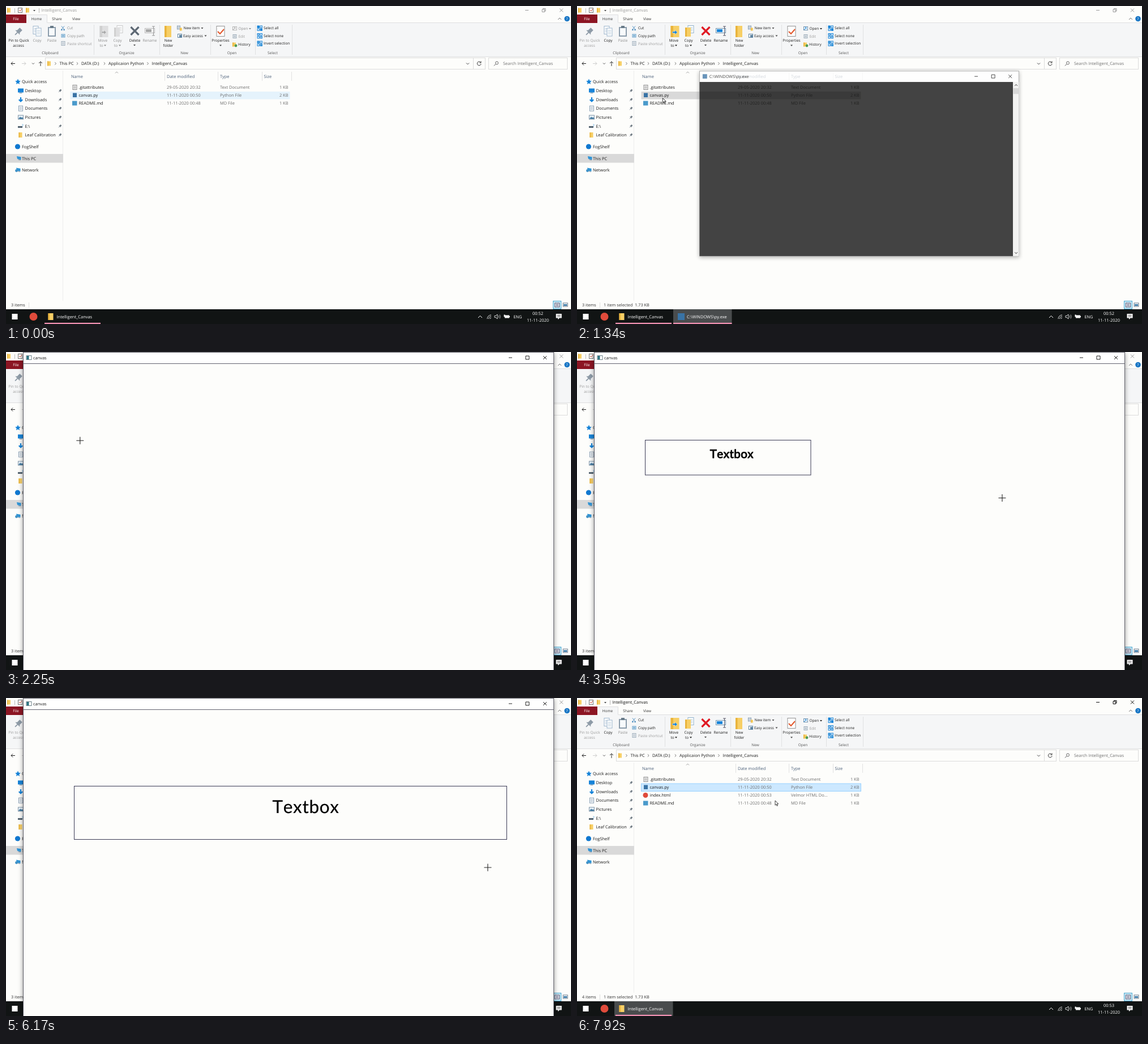
Write an HTML page that moves like this. It is 998x561 px and loops after 8 s.

```html
<!DOCTYPE html>
<html lang="en">
<head>
<meta charset="utf-8">
<title>Canvas demo</title>
<style>
html, body { margin: 0; width: 100%; height: 100%; overflow: hidden; background: #fdfdfb; }
svg { display: block; width: 100%; height: 100%; }
text { font-family: "Open Sans", "Noto Sans", sans-serif; text-rendering: geometricPrecision; white-space: pre; }
#label { font-family: Lato, sans-serif; font-kerning: none; letter-spacing: .022em; }
</style>
</head>
<body>
<svg id="stage" viewBox="0 0 998 561"></svg>
<script>
const INK = '#1c1c1c', GREY = '#9b9b9b', BLUE = '#1683d8', GOLD = '#f7cf66', PINK = '#ee8fb0', PAPER = '#fdfdfb';

// Drawing helpers; text y is the vertical middle of the line
const rect = (x, y, w, h, fill, more = '') =>
  `<rect x="${x}" y="${y}" width="${w}" height="${h}" style="fill:${fill}" ${more}/>`;
const path = (d, stroke, w = 1, fill = 'none') =>
  `<path d="${d}" style="stroke:${stroke};fill:${fill}" stroke-width="${w}"/>`;
const dot = (x, y, r, fill) => `<circle cx="${x}" cy="${y}" r="${r}" fill="${fill}"/>`;
const text = (x, y, s, fill = INK, size = 7.45, anchor = 'start', id = '') =>
  `<text x="${x}" y="${y + size * 0.36}" font-size="${size}" text-anchor="${anchor}" style="fill:${fill}" ${id && `id="${id}"`}>${s}</text>`;
const small = (x, y, s, fill = INK) => text(x, y, s, fill, 6.5);
const mid = (x, y, s, fill = INK, size = 6.5) => text(x, y, s, fill, size, 'middle');
const group = (id, body, more = '') => `<g id="${id}" ${more}>${body}</g>`;
const frame = (x, y, w, h, stroke, fill = 'none') =>
  rect(x + .5, y + .5, w - 1, h - 1, fill, `stroke="${stroke}" stroke-width="1"`);
const caret = (x, y, c = '#444') => path(`M${x - 2} ${y - 1}h4l-2 2.4z`, 'none', 0, c);
const chevron = (x, y) => path(`M${x - 1.2} ${y - 2.2}l2.3 2.2l-2.3 2.2`, '#666', .9);

const folder = (x, y, w = 7, h = 9) =>
  rect(x - w / 2, y - h / 2, w, h, GOLD) + rect(x - w / 2, y - h / 2, w * .3, h, '#e9b43c');
const page = (x, y, w = 8, h = 10, c = '#8aa0b4') =>
  frame(x - w / 2, y - h / 2, w, h, c, '#fff') +
  [-.2, 0, .2].map(k => path(`M${x - w * .28} ${y + h * k}h${w * .56}`, c, .8)).join('');
const screen = (x, y) => rect(x - 5, y - 4, 10, 7, BLUE) + rect(x - 2.5, y + 3.4, 5, 1, '#5c7f9c');
const tilted = (x, y) => path(`M${x - 3.5} ${y - 3}l7.5 1.2v5l-6.5 -1.4z`, 'none', 0, '#2f94d6') +
  path(`M${x - 1} ${y + 3}l4.5 .8`, '#5c7f9c', .9);
const pin = (x, y, k = 1, c = '#707b84') =>
  `<g transform="translate(${x} ${y}) rotate(45) scale(${k})">` +
  path('M-1.6 -3.2h3.2v3.2l1.2 1.2h-5.6l1.2 -1.2z', 'none', 0, c) + path('M0 1v3.2', c, .9) + '</g>';
const winIcon = (x, y) =>
  frame(x - 5, y - 4, 10, 8, '#6c8088', '#fff') + rect(x - 4, y - 3, 4, 6, '#2a7480');

// Minimise, maximise or restore, close
function controls(a, b, c, y, col, restore) {
  const box = restore
    ? `M${b - 3} ${y - 1.5}h4.5v4.5h-4.5zM${b - 1.5} ${y - 1.5}v-1.5h4.5v4.5h-1.5`
    : `M${b - 3} ${y - 3}h6v6h-6z`;
  return path(`M${a - 3} ${y}h6`, col) + path(box, col) +
    path(`M${c - 3} ${y - 3}l6 6m0 -6l-6 6`, col);
}

function ribbon() {
  const on = 'var(--on)', off = 'var(--off)';
  let s = rect(0, 30, 998, 59, '#f5f6f7') + path('M0 29.5h36m37 0h925M0 89.5h998', '#dedfe0') +
    rect(0, 15, 36, 15, '#8c1523') + mid(17.5, 22.5, 'File', '#fff') +
    rect(36, 15, 37, 15, '#f5f6f7') + path('M36.5 15.5h36v14', '#dedfe0') +
    mid(54, 22.5, 'Home', '#333') + mid(90, 22.5, 'Share', '#333') + mid(124, 22.5, 'View', '#333') +
    path('M975 24l3 -3l3 3', '#777') + dot(991, 22.5, 4.8, '#1976c5') + mid(991, 22.5, '?', '#fff') +
    path('M155.5 33v53M271.5 33v53M361.5 33v53M440.5 33v53M505.5 33v53', '#e0e1e2');
  s += pin(22, 45, 2, '#8e9ba7') + mid(22.5, 61, 'Pin to Quick', off) + mid(22, 70, 'access', off) +
    page(52.5, 42.5, 10, 15, '#9db6cd') + page(57.5, 46, 10, 15, '#9db6cd') + mid(55, 61, 'Copy', on) +
    rect(74, 37, 14, 17, '#8b9cab') + rect(76, 39, 10, 13, '#f7fafc') + rect(78, 35, 6, 4, '#687a88') +
    mid(81, 61, 'Paste', '#8d8d8d') +
    path('M98 35.5l5 6m0 -6l-5 6', '#3d83b8', .9) + dot(98.4, 42, 1.2, '#3d83b8') + dot(102.6, 42, 1.2, '#3d83b8') +
    page(101, 52.5, 7, 6, '#5f9cc8') + page(101, 66, 7, 8, '#9aaab8') +
    small(108, 39, 'Cut', on) + small(108, 52.5, 'Copy path', on) + small(108, 66.5, 'Paste shortcut', GREY);
  const arrow = 'M-6 0h6v-3.5l6 5.5l-6 5.5v-3.5h-6z';
  s += group('tools', folder(173, 45, 15, 20) +
    `<g transform="translate(173 45) scale(.7)">${path(arrow, '#fff', .6, BLUE)}</g>` +
    page(201, 41, 11, 14, '#8fb1cc') + folder(196, 46, 10, 16) +
    frame(245, 39, 18, 9, '#6d91ad', '#fff') + rect(247, 41, 10, 5, BLUE) +
    path('M258 36h5m-2.5 0v16m-2.5 0h5', '#445', .9) +
    frame(400, 36, 8, 7, '#6d91ad', '#fff') + path('M401 42l4 -4m-2.5 0h2.5v2.5', BLUE)) +
    path('M220.5 37l14 14m0 -14l-14 14', 'var(--del)', 3.2) +
    mid(171, 61, 'Move', on) + mid(197, 61, 'Copy', on) + mid(227.5, 61, 'Delete') + mid(254, 61, 'Rename', on) +
    mid(168.5, 70, 'to', on) + mid(194, 70, 'to', on) + caret(175, 69.5, on) + caret(201, 69.5, on) + caret(227, 69);
  s += folder(286, 45, 12, 20) + mid(286.5, 61, 'New') + mid(286.5, 70, 'folder') +
    page(305, 38, 6, 7) + folder(309, 41, 4, 5) + frame(303, 49, 8, 7, '#5f84a0', '#fff') + rect(306, 51, 5, 5, '#5f84a0') +
    small(313.5, 39, 'New item') + caret(346.5, 39) + small(313, 52.5, 'Easy access') + caret(352.5, 52.5) +
    frame(371.5, 35, 15, 19, '#929292', '#fff') + path('M374 45l4 4l7 -8', '#e2572c', 2) +
    mid(379, 61, 'Properties') + caret(379, 69.5) +
    page(404, 53.5, 7, 7, '#9aaab8') + folder(403, 68, 6, 7) + dot(406, 70, 2.4, '#4d9c58') +
    small(410.5, 40, 'Open', on) + caret(431, 40, on) + small(410.5, 53.5, 'Edit', GREY) + small(410, 68, 'History');
  [['Select all', 39, BLUE], ['Select none', 52.5, '#a9cbe4'], ['Invert selection', 66, '#5ba7dc']].forEach(([n, y, c]) => {
    for (let i = 0; i < 4; i++) s += frame(443.5 + (i % 2) * 5, y - 4.5 + (i >> 1) * 5, 4.4, 4.4, BLUE, i % 3 ? '#e8f2fa' : c);
    s += small(455, y, n);
  });
  [['Clipboard', 78], ['Organize', 213], ['New', 315], ['Open', 399], ['Select', 471]]
    .forEach(([n, x]) => s += mid(x, 83, n, '#555'));
  return s;
}

function addressBar() {
  let s = path('M16 101.5h-7m3 -3l-3 3l3 3', '#222') + path('M28 101.5h7m-3 -3l3 3l-3 3', '#ccc') +
    path('M46 100.5l2 2l2 -2', '#555') + path('M61 106v-8m-3 3l3 -3l3 3', '#333') +
    frame(69, 91, 757, 21, '#dcdcdc') + frame(825, 91, 22, 21, '#dcdcdc') + frame(852, 91, 140, 21, '#dcdcdc') +
    folder(76, 101.5, 6, 8) + path('M813 100.5l2.5 2.5l2.5 -2.5', '#444') +
    path('M838.5 99.5a3.4 3.4 0 1 0 .6 2.5M839 97.5v2.6h-2.6', '#333') +
    `<circle cx="867" cy="100.5" r="2.5" fill="none" stroke="#555" stroke-width=".9"/>` + path('M865 102.5l-3 3', '#555') +
    text(878, 101.5, 'Search Intelligent_Canvas', '#707070');
  [['This PC', 94.5], ['DATA (D:)', 133], ['Applicaion Python', 181], ['Intelligent_Canvas', 257.5]]
    .forEach(([n, x]) => s += chevron(x - 7, 101.5) + text(x, 101.5, n));
  return s;
}

function navPane() {
  const y = i => 149.5 + i * 15.6;
  let s = path('M100.5 114v406', '#ededed') + rect(0, 261, 101, 15.5, '#d9d9d9') +
    path('M21 128.6l1.4 3.2l3.4 .4l-2.5 2.3l.7 3.4l-3 -1.7l-3 1.7l.7 -3.4l-2.5 -2.3l3.4 -.4z', 'none', 0, BLUE) +
    text(28, 133.5, 'Quick access') +
    screen(26, y(0)) + path(`M26 ${y(1) - 4}v7m-3.2 -3l3.2 3.2l3.2 -3.2`, BLUE, 2.2) + page(26, y(2)) +
    frame(21, y(3) - 4, 10, 8, '#8195a6', '#e9f3fa') + path(`M22 ${y(3) + 3}l3 -4l2 2l1.5 -1.5l2 3.5z`, 'none', 0, '#3f779f') +
    rect(21, y(4), 8, 3, '#50606c') + text(28, y(4) - 1, '?', BLUE, 6) + folder(25.5, y(5), 6, 9);
  ['Desktop', 'Downloads', 'Documents', 'Pictures', 'E:\\'].forEach((n, i) => s += text(33.5, y(i), n));
  for (let i = 0; i < 6; i++) s += pin(95.5, y(i), .85);
  s += `<g clip-path="url(#navClip)">${text(33.5, y(5), 'Leaf Calibration')}</g>` +
    dot(20.5, 248, 4.6, '#0f78d0') + text(28, 248, 'FogShelf') +
    tilted(22.5, 268) + text(28, 269, 'This PC') +
    tilted(21.5, 288.5) + dot(18.5, 290.5, 2.4, '#3f91c6') + text(28, 289.5, 'Network');
  return s;
}

function fileList() {
  const row = (y, name, date, type, size) => text(128.5, y, name) + text(284, y, date, '#6d6d6d') +
    text(378, y, type, '#6d6d6d') + text(498.5, y, size, '#6d6d6d', 7.45, 'end');
  return path('M280.5 116v16M374.5 116v16M452.5 116v16M504.5 116v16', '#e2e2e2') +
    path('M193 118.5l2.5 -2.5l2.5 2.5', '#888', .8) +
    [['Name', 115], ['Date modified', 284], ['Type', 378], ['Size', 455.5]].map(([n, x]) => text(x, 124, n, '#4c607a')).join('') +
    rect(113.5, 151, 388, 13.5, 'var(--row)', 'id="row"') +
    page(121.5, 143.5, 8, 9, '#8b8b8b') + rect(118, 153.5, 7, 7.5, '#3973a5') +
    row(143.5, '.gitattributes', '29-05-2020 20:32', 'Text Document', '1 KB') +
    row(157.5, 'canvas.py', '11-11-2020 00:50', 'Python File', '2 KB') +
    group('page', dot(121, 171.5, 4.5, '#df4b3b') + row(171.5, 'index.html', '11-11-2020 00:53', 'Velmor HTML Do...', '1 KB')) +
    group('readme', rect(117, 167.5, 8.5, 8, '#4a9acb') + row(171.5, 'README.md', '11-11-2020 00:48', 'MD File', '1 KB'));
}

function explorer() {
  return rect(0, 0, 998, 561, PAPER) + folder(5, 7.5, 6, 8) + path('M15.5 4v8M58.5 4v8', '#aaa', .8) +
    frame(21, 3, 8, 9, '#777', '#fff') + path('M23 7l2 2l3 -4', '#cc4b35') + folder(38, 7.5, 6, 8) + caret(50, 8) +
    text(62.5, 7.5, 'Intelligent_Canvas', 'var(--title)') + controls(920, 950, 981, 7.5, 'var(--title)', true) +
    ribbon() + addressBar() + navPane() + fileList() +
    text(9, 527.5, '3 items', '#333', 7.3, 'start', 'count') + path('M40.5 523v9', '#ddd') +
    text(47, 527.5, '1 item selected  1.73 KB', '#333', 7.3, 'start', 'status') +
    frame(966, 520, 15, 15, '#4fa6cf', '#c5e8f5') + page(973.5, 527.5, 9, 8, '#557') +
    frame(983.5, 523.5, 9, 7, '#678', '#fff') + rect(985, 526, 6, 3, '#4784b0');
}

function consoleWin() {
  return rect(212, 112, 573, 332, '#fff', 'filter="url(#shadow)"') + frame(212, 112, 573, 332, '#8f8f8f', '#fff') +
    rect(218, 118, 8, 8, '#3973a5') + text(230, 122, 'C:\\WINDOWS\\py.exe', 'var(--con)') +
    controls(708, 738.5, 769, 122, 'var(--con)') +
    rect(212.5, 132, 561.5, 311.5, '#070707') + rect(774, 132, 10.5, 311.5, '#f0f0f0') + rect(774.5, 143, 10, 10.5, '#cdcdcd') +
    path('M777 139l2.5 -2.5l2.5 2.5M777 436.5l2.5 2.5l2.5 -2.5', '#444', 1.1);
}

function taskbar() {
  const line = (x, w) => rect(x, 558.8, w, 2.2, PINK);
  return rect(0, 535, 998, 26, '#111414') + rect(10.5, 543, 10, 10, '#fff') + dot(48.5, 548, 7, '#df4b3b') +
    rect(66, 535, 103.5, 26, '#494c4d', 'id="taskOn"') + line(68, 99) + folder(79, 548, 9, 12) +
    text(89.5, 548, 'Intelligent_Canvas', '#fff') +
    group('taskPy', rect(170, 535, 103.5, 26, '#494c4d', 'id="pyOn"') + line(170, 103.5) + rect(178, 542, 12, 12, '#3973a5') +
      text(194, 548, 'C:\\WINDOWS\\py.exe', '#fff')) +
    group('taskCv', rect(277, 535, 84, 26, '#494c4d', 'id="cvOn"') + rect(277, 558.8, 84, 2.2, PINK, 'id="cvLine"') +
      winIcon(285, 548) + text(298, 548, 'canvas', '#fff', 7.45, 'start', 'cvText')) +
    path('M834 550l3.5 -3.5l3.5 3.5', '#fff') +
    path('M850 552a7 7 0 0 1 7 -7M852.5 552a4.5 4.5 0 0 1 4.5 -4.5M855 552a2 2 0 0 1 2 -2', '#ddd') +
    path('M863 546.5h2l3 -2.5v8l-3 -2.5h-2z', '#fff', .8) + path('M870 546q1.5 2 0 4M872 544.5q2.5 3.5 0 7', '#ccc', .8) +
    rect(881, 545.5, 8, 5, '#fff') + rect(889, 547, 1, 2, '#fff') + rect(879.5, 544.5, 2, 4, '#fff') +
    mid(904, 548, 'ENG', '#fff', 7.3) + text(939.5, 542, '00:52', '#fff', 7.45, 'middle', 'clock') +
    mid(939.5, 554, '11-11-2020', '#fff', 7.45) +
    path('M971.5 543h10v7.5h-4l-2.5 2.5v-2.5h-3.5z', 'none', 0, '#fff') + path('M973.5 545.5h6M973.5 548h6', '#222', .8);
}

function canvasWin() {
  return rect(30, 0, 938, 580, '#fff', 'filter="url(#shadow)"') + frame(30, 0, 938, 580, '#5c5c66', PAPER) +
    rect(31, 1, 936, 19, '#fff') + path('M30 20.5h937', '#62626f') + winIcon(40.5, 10) + text(48, 10, 'canvas') +
    controls(891, 921, 952, 10, '#222') +
    rect(120.5, 155.5, 0, 0, 'none', 'id="box" stroke="#3a3a55" stroke-width="1"') +
    '<text id="label" fill="#000" stroke="#000" stroke-linejoin="round">Textbox</text>';
}

const stage = document.getElementById('stage');
stage.innerHTML = `<defs><clipPath id="navClip"><rect x="30" y="220" width="61.5" height="16"/></clipPath>
  <filter id="shadow" x="-5%" y="-5%" width="110%" height="110%"><feDropShadow dx="0" dy="2" stdDeviation="4" flood-opacity=".42"/></filter></defs>` +
  group('explorer', explorer()) + group('console', consoleWin()) + group('taskbar', taskbar()) + group('canvas', canvasWin()) +
  group('arrow', path('M0 0v8.2l1.9 -1.8l1.3 3l1.3 -.6l-1.3 -2.9h2.6z', '#111', .8, '#fff')) +
  group('cross', path('M-6.5 0h13M0 -6.5v13', '#222', 1.1));

// [time, values...]
const pointer = [[0, 155, 160], [500, 153, 162], [1090, 152, 166], [1500, 151, 160], [1840, 151, 159], [2450, 121, 155], [2840, 121, 155],
  [3350, 413, 217], [3580, 751, 257.5], [3630, 751, 257.5], [3840, 871, 251], [4300, 883.5, 249.5], [4840, 883.5, 249.5],
  [5590, 862, 290], [6170, 851, 299], [6590, 851, 299], [7250, 459, 221], [7420, 459, 221], [7920, 350, 181], [8000, 350, 181]];
const corner = [[2840, 121, 155], [3580, 413, 217], [3630, 413, 217], [3840, 871, 251], [4300, 884.5, 249.5]];
const canvasFade = [[1720, 0, .9], [1840, .7, .986], [1960, 1, 1], [6430, 1, 1], [6510, .45, .97], [6590, 0, .93]];
const consoleFade = [[1250, 0, .9], [1340, .75, .986], [1440, 1, 1], [6670, 1, 1], [6840, 0, .92]];

function at(rows, t) {
  const i = rows.findIndex(r => r[0] > t);
  if (i === 0) return rows[0].slice(1);
  if (i < 0) return rows[rows.length - 1].slice(1);
  const a = rows[i - 1], b = rows[i], k = (t - a[0]) / (b[0] - a[0]);
  return a.slice(1).map((v, j) => v + (b[j + 1] - v) * k);
}

const el = {};
stage.querySelectorAll('[id]').forEach(e => el[e.id] = e);
const show = (id, yes) => el[id].style.display = yes ? '' : 'none';
const set = (id, props) => { for (const k in props) el[id].setAttribute(k, props[k]); };
const between = (t, a, b) => t >= a && t < b;

function zoom(id, rows, t, cx, cy) {
  const [o, s] = at(rows, t);
  show(id, o > 0);
  set(id, { opacity: o, transform: `translate(${cx} ${cy}) scale(${s}) translate(${-cx} ${-cy})` });
}

function draw(t) {
  const picked = t >= 420, saved = t >= 6850;
  const front = between(t, 420, 1250) || t >= 6680;
  const conFront = between(t, 1250, 1720) || between(t, 6430, 6680);
  const vars = {
    title: front ? '#111' : GREY, con: conFront ? '#111' : GREY,
    on: picked ? INK : '#8d8d8d', off: picked ? GREY : INK, del: picked ? '#e01a24' : '#5e6974',
    row: !picked ? '#e5f3fc' : front ? '#cce8ff' : '#d9d9d9'
  };
  for (const k in vars) stage.style.setProperty('--' + k, vars[k]);
  set('row', { stroke: picked && front ? '#99d1ff' : 'none' });
  el.tools.style.filter = picked ? '' : 'grayscale(1) opacity(.6)';
  show('status', picked);
  show('page', saved);
  set('readme', { transform: `translate(0 ${saved ? 14 : 0})` });
  el.count.textContent = saved ? '4 items' : '3 items';
  el.clock.textContent = t < 4400 ? '00:52' : '00:53';

  show('taskOn', front);
  show('taskPy', between(t, 1250, 6760));
  show('pyOn', conFront);
  show('taskCv', between(t, 1720, 6680));
  const closing = t >= 6500;
  show('cvText', !closing);
  set('cvOn', { width: closing ? 16 : 84 });
  set('cvLine', { width: closing ? 16 : 84 });
  zoom('console', consoleFade, t, 498.5, 278);
  zoom('canvas', canvasFade, t, 498.5, 245);

  const [x, y] = at(corner, t), w = x - 120.5, h = y - 155.5, size = Math.max(0, h * .335);
  show('box', t > 2860);
  show('label', t > 2860 && h > 6);
  set('box', { width: Math.max(0, w), height: Math.max(0, h) });
  set('label', { x: 120.5 + w / 2 - 32, y: 155.5 + h / 2 + .8, 'font-size': size,
    'stroke-width': Math.max(.2, 2.4 - size * .072) });

  const [px, py] = at(pointer, t), cross = between(t, 1760, 6500);
  show('arrow', !cross && t >= 90);
  show('cross', cross);
  set(cross ? 'cross' : 'arrow', { transform: `translate(${px} ${py})` });
}

const start = performance.now();
function tick() {
  draw((performance.now() - start) % 8000);
  requestAnimationFrame(tick);
}
tick();
</script>
</body>
</html>
```
